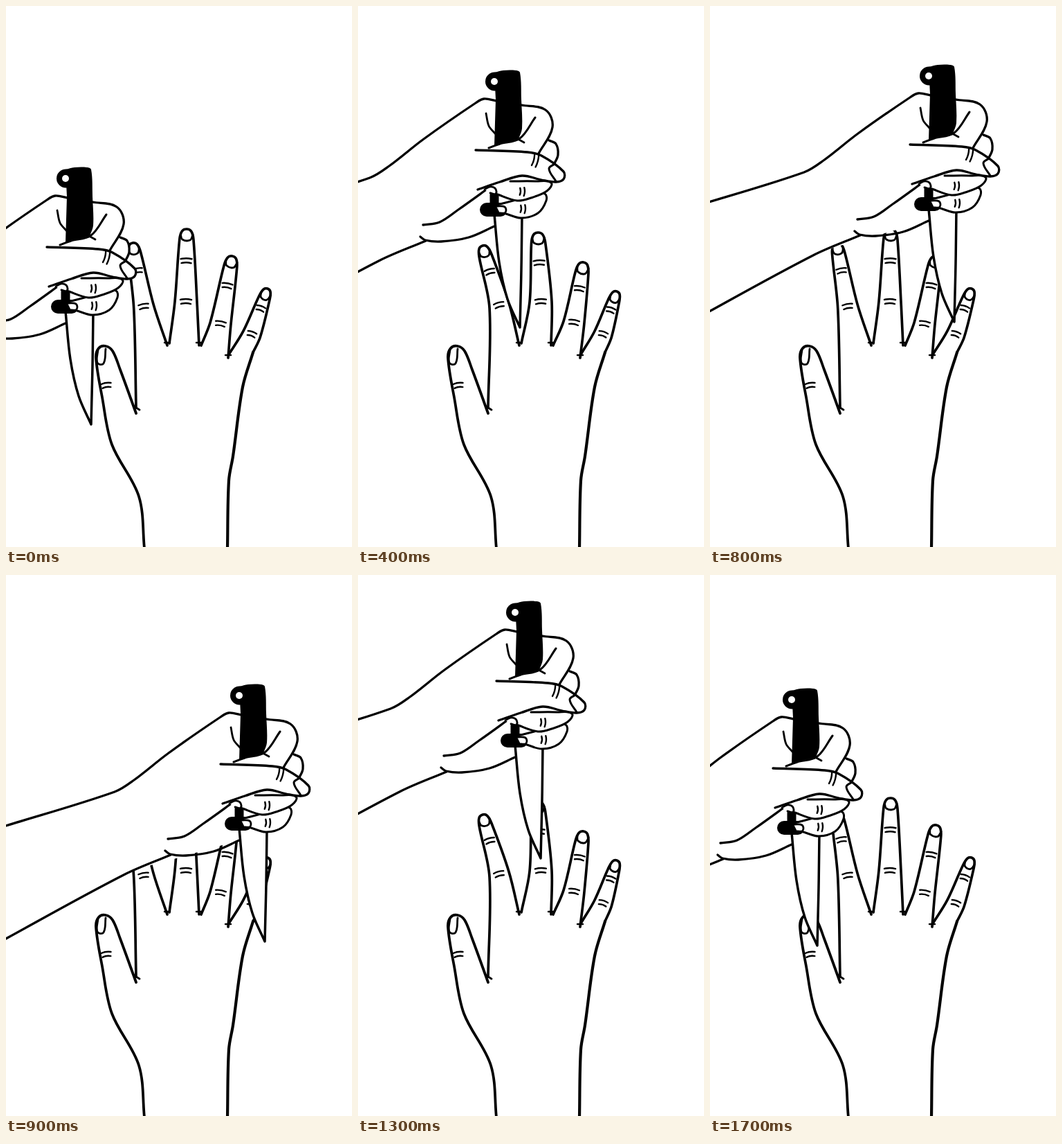
Write an HTML page that moves like this. It is 500 px wide and 781 px high and loops after 1.8 s.

```html
<!DOCTYPE html>
<html lang="en">
<head>
<meta charset="utf-8">
<title>Knife game</title>
<style>
  html, body { margin: 0; width: 100%; height: 100%; overflow: hidden; background: #fff; }
  svg { display: block; width: 500px; height: 781px; }
  path { stroke: #000; stroke-linecap: round; stroke-linejoin: round; }
</style>
</head>
<body>
<svg id="stage" viewBox="0 0 500 781"></svg>
<script>
const stage = document.getElementById('stage');
const WHITE = '#fff', BLACK = '#000';

function add(parent, tag, attrs = {}) {
  const el = document.createElementNS('http://www.w3.org/2000/svg', tag);
  for (const key in attrs) el.setAttribute(key, attrs[key]);
  return parent.appendChild(el);
}

// Point reached from p by moving along the direction a -> b.
function shift(p, a, b, distance) {
  const dx = b[0] - a[0], dy = b[1] - a[1], k = distance / (Math.hypot(dx, dy) || 1);
  return [p[0] + dx * k, p[1] + dy * k];
}

// Smooth path through "x y x y ..."; a repeated point makes a corner.
function curve(text) {
  const n = text.split(' ').map(Number);
  const p = Array.from({ length: n.length / 2 }, (_, i) => [n[2 * i], n[2 * i + 1]]);
  let d = 'M' + p[0];
  for (let i = 0; i < p.length - 1; i++) {
    const a = p[i - 1] || p[i], b = p[i], c = p[i + 1], e = p[i + 2] || c;
    const reach = Math.hypot(c[0] - b[0], c[1] - b[1]) / 3;
    d += `C${shift(b, a, c, reach)} ${shift(c, b, e, -reach)} ${c}`;
  }
  return d;
}

const line = (g, pts, width = 3.3, fill = 'none') =>
  add(g, 'path', { d: curve(pts), fill, 'stroke-width': width });

// Pair of short skin creases.
const crease = (g, x, y, angle, size = 7) => add(g, 'path', {
  d: `M${-size} -3Q0 -5 ${size} -3M${1 - size} 3Q0 1 ${size - 1} 3`,
  transform: `translate(${x} ${y}) rotate(${angle})`, fill: 'none', 'stroke-width': 2.4
});

// Finger from two base points, the tip, the lower knuckle and its half width.
function finger(g, { left, right, w }, [tip, knuckle]) {
  const length = Math.hypot(knuckle[0] - tip[0], knuckle[1] - tip[1]);
  const ax = (knuckle[0] - tip[0]) / length, ay = (knuckle[1] - tip[1]) / length;
  const at = (down, across) => [tip[0] + ax * down + ay * across, tip[1] + ay * down - ax * across];
  const join = pts => pts.flat().join(' ');
  const t = w * 0.63;
  line(g, join([left, at(length, -w), at(15, -t), at(3, -t * 0.65), at(0, 0),
    at(3, t * 0.65), at(15, t), at(length, w), right]), 3.7);
  line(g, join([at(8, -t * 0.85), at(15, -t * 0.6), at(16, t * 0.5), at(8, t * 0.9)]), 2.8);
  const angle = Math.atan2(-ax, ay) * 180 / Math.PI;
  for (const part of [0.44, 1]) crease(g, ...at(length * part, 0), angle, w / 2);
}

// Resting hand: each finger has a spread and a relaxed [tip, knuckle].
const fingers = [
  { left: [188, 580], right: [233, 490], w: 14.5, spread: [[183, 342], [199, 434]], relaxed: [[180, 346], [204, 432]] },
  { left: [236, 487], right: [279, 490], w: 16, spread: [[261, 322], [260, 427]], relaxed: [[260, 327], [264, 427]] },
  { left: [282, 490], right: [321, 508], w: 15, spread: [[327, 361], [310, 459]], relaxed: [[326, 370], [312, 457]] },
  { left: [322, 503], right: [357, 500], w: 13, spread: [[378, 408], [355, 474]], relaxed: [[374, 412], [354, 474]] }
];
const rest = add(stage, 'g');
line(rest, '200 783 192 708 153 633 139 565 130 508 134 494 144 491 154 498 165 525 188 588', 3.8);
line(rest, '185 578 193 583', 2.8);
line(rest, '357 500 342 550 328 650 322 685 320 783', 4.2);
line(rest, '133 496 132 515 141 516 144 495', 2.8);
crease(rest, 145, 548, -8);
for (const { right: [x, y] } of fingers.slice(0, 3)) line(rest, `${x - 4} ${y - 4} ${x + 4} ${y - 4}`, 2.4);

const [spread, relaxed] = ['spread', 'relaxed'].map(pose => {
  const g = add(rest, 'g');
  fingers.forEach(f => finger(g, f, f[pose]));
  return g;
});

// Stabbing arm, drawn where it reaches farthest right
const arm = add(stage, 'g');
const armTop = '-20 368 0 362 157 313 185 296 235 257 310 205 322 199 340 202';
line(arm, armTop + ' 376 208 410 215 421 238 429 275 429 312 412 345 376 371 337 383 260 405 170 433 0 525 -20 537', 0, WHITE);
line(arm, '337 366 344 435 356 488 374 529 374 529 376 445 377 366', 3.5, WHITE);
line(arm, armTop);
line(arm, '376 208 411 215 421 240 401 278');
line(arm, '416 259 426 264 429 280 423 294');
line(arm, '-20 537 0 525 170 433 238 404');
line(arm, '230 398 237 403 260 405 300 399 337 383');
line(arm, '234 381 258 377 285 359 331 326');
line(arm, '325 220 329 238 338 249', 2.8);

// Guard
line(arm, '337 338 337 355', 13);
line(arm, '326 359 346 359', 20);

// Ring and middle fingers
line(arm, '341 352 376 343 398 337 410 336 412 346 400 364 376 371 354 365', 3, WHITE);
line(arm, '340 354 352 355 353 363 345 364', 2.8, WHITE);
line(arm, '360 318 397 318 419 320 413 332 390 342 370 346 339 336', 3, WHITE);
line(arm, '323 330 330 326 338 328 339 336 331 335', 2.8, WHITE);
crease(arm, 377, 333, 93, 6);
crease(arm, 378, 358, 93, 6);

// Handle
add(arm, 'circle', { cx: 337.5, cy: 174, r: 13.5, fill: BLACK });
line(arm, '337 161 350 158 368 158 374 161 376 200 377 242 372 257 372 257 337 267 337 267 339 200', 0, BLACK);
add(arm, 'circle', { cx: 337, cy: 174, r: 5, fill: WHITE });
line(arm, '329 270 345 264 374 256 396 226', 3);
line(arm, '371 257 380 262', 2.8);

// Thumb
line(arm, '310 273 385 276 405 281 437 304 437 315 426 319 405 316 377 310 345 319 313 330', 3.3, WHITE);
line(arm, '424 293 416 300 426 318', 3);
crease(arm, 396, 288, 105, 9);

// Top of the knife at each step from the thumb side to the little finger
const stops = [[86, 249], [118, 180], [145, 200], [171, 85], [197, 109],
               [227, 54], [252, 104], [296, 113], [316, 101], [337, 174]];

function draw() {
  const step = Math.floor(performance.now() / 100) % 18;
  const i = Math.min(step, 18 - step);
  const [x, y] = stops[i];
  const open = i < 2 || i > 7;
  arm.setAttribute('transform', `translate(${x - 337} ${y - 174})`);
  spread.setAttribute('visibility', open ? 'visible' : 'hidden');
  relaxed.setAttribute('visibility', open ? 'hidden' : 'visible');
  requestAnimationFrame(draw);
}
draw();
</script>
</body>
</html>
```
